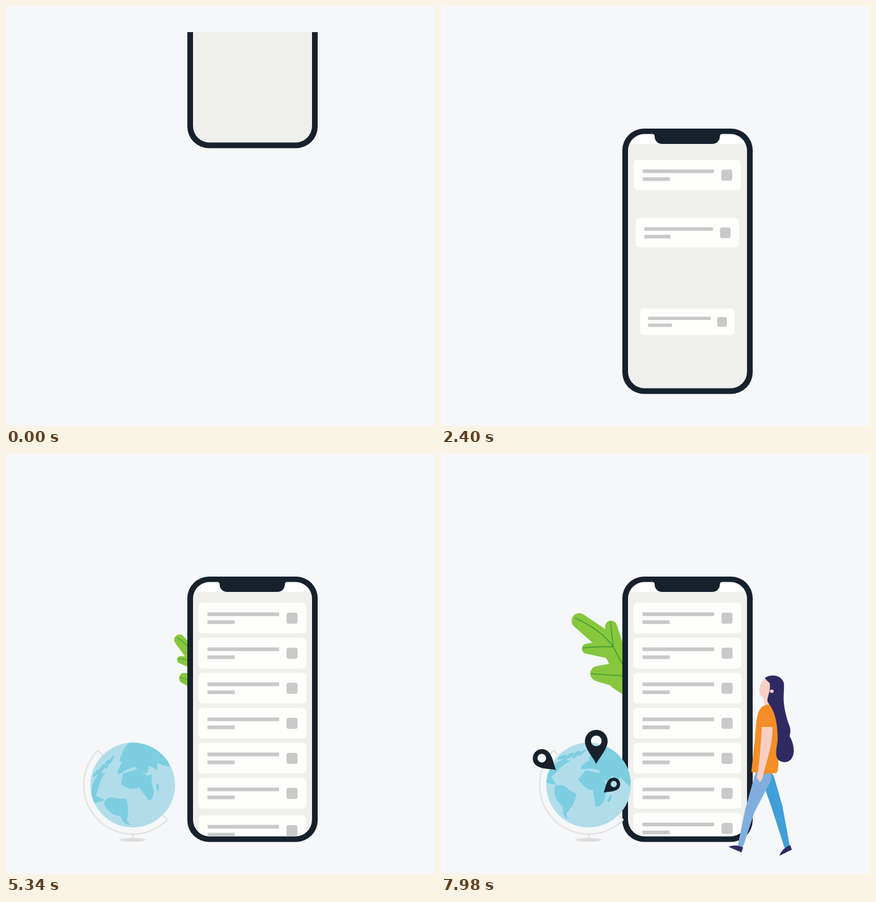
An HTML page with a canvas that plays this animation: 757x740 px, repeating every 8000 ms.

```html
<!DOCTYPE html>
<html lang="en">
<head>
<meta charset="utf-8">
<title>Phone, globe and walker</title>
<style>
  html, body { margin: 0; width: 100%; height: 100%; overflow: hidden; background: #f5f7f9; }
  canvas { display: block; }
</style>
</head>
<body>
<canvas id="stage" width="757" height="740"></canvas>
<script>
const ctx = document.getElementById('stage').getContext('2d');
const LOOP = 8000, TAU = Math.PI * 2, DEG = Math.PI / 180;
const PAPER = '#f5f7f9', INK = '#16212c', GRAY = '#c9c9c9';
const SKIN = '#f9cfc4', HAIR = '#302a63', GREEN = '#86c73d', LAND = '#7ccee0';

function rounded(x, y, w, h, r) {
  const path = new Path2D();
  path.roundRect(x, y, w, h, r);
  return path;
}

function ellipse(x, y, rx, ry = rx, angle = 0) {
  const path = new Path2D();
  path.ellipse(x, y, rx, ry, angle, 0, TAU);
  return path;
}

// Outline around two circles: a limb or a leaf lobe.
function taper(x1, y1, r1, x2, y2, r2) {
  const dir = Math.atan2(y2 - y1, x2 - x1);
  const spread = Math.acos((r1 - r2) / Math.hypot(x2 - x1, y2 - y1));
  const path = new Path2D();
  path.arc(x1, y1, r1, dir + spread, dir - spread + TAU);
  path.arc(x2, y2, r2, dir - spread, dir + spread);
  path.closePath();
  return path;
}

function fill(path, color, rule = 'nonzero') {
  ctx.fillStyle = color;
  ctx.fill(path, rule);
}

function stroke(path, color, width) {
  ctx.strokeStyle = color;
  ctx.lineWidth = width;
  ctx.stroke(path);
}

function group(draw) {
  ctx.save();
  draw();
  ctx.restore();
}

// Scale and turn around a pivot, then shift.
function pose(x, y, scale, angle = 0, dx = 0, dy = 0) {
  ctx.translate(x + dx, y + dy);
  ctx.rotate(angle);
  ctx.scale(scale, scale);
  ctx.translate(-x, -y);
}

// What is left of a cubic ease-out: 1 before the start, 0 after the end.
function remaining(tick, start, duration) {
  const p = Math.min(1, Math.max(0, (tick - start) / duration));
  return (1 - p) ** 3;
}

// Steps come in threes that last 20, 20 and 100 ms.
function tickAt(ms) {
  const shifted = ms + 20, rest = shifted % 140;
  return Math.floor(shifted / 140) * 3 + (rest >= 40 ? 2 : rest >= 20 ? 1 : 0) - 1;
}

const body = rounded(320, 216, 230, 467.5, 38);
const screen = rounded(330, 225.5, 210, 448, 29);
const notch = new Path2D('M373 225 Q377 226 377 230 A13 13 0 0 0 390 243 H479 A13 13 0 0 0 492 230 Q492 226 496 225 Z');
const card = rounded(339.5, 262, 190.5, 54, 7);
const cardIcon = rounded(495, 279.5, 19.5, 19.5, 4);

function drawCards(tick) {
  for (let i = 0; i < 7; i++) {
    const left = remaining(tick, 15 + i * 10, 50);
    group(() => {
      pose(434.75, 289, 1 - 0.44 * left, 0, 0, i * 61.75 + 500 * left);
      fill(card, '#fdfdfc');
      ctx.fillStyle = GRAY;
      ctx.fillRect(355.5, 279, 126.5, 6.5);
      ctx.fillRect(355.5, 293, 48, 6.5);
      fill(cardIcon, GRAY);
    });
  }
}

function drawPhone(tick) {
  group(() => {
    ctx.beginPath();
    ctx.rect(0, 46, 757, 694);
    ctx.clip();
    ctx.translate(0, -870 * remaining(tick, -8.3, 40));
    fill(body, INK);
    group(() => {
      ctx.clip(screen);
      ctx.fillStyle = '#fff';
      ctx.fillRect(330, 225, 210, 18);
      ctx.fillStyle = '#efefed';
      ctx.fillRect(330, 243, 210, 431);
      drawCards(tick);
    });
    fill(notch, INK);
  });
}

const leafParts = [
  taper(244, 294, 13.5, 300, 337, 18),
  taper(300, 304, 10.5, 308, 345, 16),
  taper(257.5, 343, 9, 305, 344, 18),
  taper(277, 387, 13.5, 330, 390, 26),
  new Path2D('M288 310 L312 315 L364 452 L300 410 Q302 372 290 358 Z')
];
const veins = new Path2D('M237 289 Q283 310 304 340 L364 452 M299 296 L304 340 M250 342 Q275 338 304 340 M264 387 L322 391');

function drawLeaf(tick) {
  const left = remaining(tick, 102, 40);
  if (left === 1) return;
  group(() => {
    pose(364, 452, 1 - left, left * 40 * DEG);
    leafParts.forEach(part => fill(part, GREEN));
    stroke(veins, '#3f9a36', 1.6);
  });
}

// The globe is drawn around its own centre.
const globe = { x: 260.5, y: 583.3, r: 74.7 };
const ball = ellipse(0, 0, globe.r);
const base = ellipse(0, 96.5, 22.5, 3.3);
const stand = new Path2D();
stand.arc(0, 0, 86.5, Math.PI / 4, Math.PI * 1.25);
stand.lineTo(-53, -53);
stand.moveTo(53, 53);
stand.lineTo(61, 61);
stand.moveTo(0, 87);
stand.lineTo(0, 95);

const continents = new Path2D(`
  M-18 -11 L-5 -26 L23 -20 L30 -2 L39 -1 Q30 12 28 27 Q18 42 12 37 L8 9 Q-8 8 -18 -11 Z
  M-60 3 Q-48 -6 -34 9 L-21 16 Q-26 36 -39 50 L-37 60 Q-48 54 -45 38 Q-63 25 -60 3 Z
  M-80 -5 Q-66 -38 -45 -45 L-31 -43 Q-46 -36 -55 -25 L-66 -14 L-56 0 Z
  M-14 -28 L-13 -34 L2 -44 L0 -49 Q17 -67 32 -69 Q60 -60 78 -15 L72 3
  L56 -14 L51 -2 L42 -17 L33 -6 Q22 -12 18 -27 L5 -29 Z`);
const madagascar = ellipse(37, 24, 2.5, 7, 0.4);

function drawIslands() {
  let seed = 11;
  const random = () => (seed = seed * 16807 % 2147483647) / 2147483647;
  for (let i = 0; i < 9; i++) {
    const x = -50 + i * 5;
    fill(ellipse(x, -48 - i * 1.6 + random() * 7, 3 + random() * 4, 2 + random() * 2, -0.5), LAND);
  }
}

function drawGlobe(tick) {
  if (tick < 102) return;
  const shift = -120 * remaining(tick, 102, 40);
  group(() => {
    ctx.globalAlpha = Math.min(1, (tick - 101) / 6);
    ctx.translate(globe.x + shift, globe.y);
    stroke(stand, '#e4e1e0', 2.4);
    fill(base, '#e1dcda');
    fill(ball, '#b1ddeb');
    ctx.clip(ball);
    ctx.rotate(shift / globe.r);
    fill(continents, LAND);
    fill(madagascar, LAND);
    drawIslands();
  });
}

// The tip is the origin.
const pin = new Path2D('M0 0 C-5 -11 -20 -26 -20 -40 A20 20 0 0 1 20 -40 C20 -26 5 -11 0 0 Z');
pin.addPath(ellipse(0, -40.5, 9.5));
const pins = [
  { x: 203, y: 557, size: 0.81, angle: -50, start: 124 },
  { x: 274, y: 546, size: 1, angle: 0, start: 146 },
  { x: 287, y: 596.5, size: 0.84, angle: 50, start: 163 }
];

function drawPins(tick) {
  for (const { x, y, size, angle, start } of pins) {
    const scale = size * (1 - remaining(tick, start, 25));
    if (!scale) continue;
    group(() => {
      ctx.translate(x, y);
      ctx.rotate(angle * DEG);
      ctx.scale(scale, scale);
      fill(pin, INK, 'evenodd');
    });
  }
}

const BACK_LEG = '#409fd7', FRONT_LEG = '#80afde';
const walker = [
  [BACK_LEG, taper(577, 572, 11, 593, 622, 9.5)],
  [BACK_LEG, taper(593, 622, 9.5, 610, 690, 5)],
  [FRONT_LEG, taper(568, 570, 15, 545, 628, 8.5)],
  [FRONT_LEG, taper(545, 628, 8.5, 529, 688, 5)],
  [HAIR, new Path2D('M507 692 Q520 687 533 693 L530 702 Z')],
  [HAIR, new Path2D('M597 708 Q600 696 616 689 L619 697 Z')],
  [SKIN, taper(575, 425, 6, 577, 443, 6)],
  [SKIN, ellipse(573, 413, 11, 17, 0.2)],
  ['#f58e28', new Path2D('M571 443 C558 447 556 468 554 500 L547.5 560 Q570 565 592 562 Q597 555 594 520 Q600 465 586 445 Q578 439 571 443 Z')],
  [HAIR, new Path2D(`M571 395 C580 387 601 388 605 404 C606 425 601 430 610 465 C614 480 619 483 615 497
    C628 520 623 543 606 543 C588 541 590 528 594 505 C594 470 588 452 577 438 C573 430 582 422 580 404 Z`)],
  [SKIN, ellipse(583.5, 418, 3.5, 3)],
  [SKIN, new Path2D('M566 481 H585 C585 515 574 540 568 568 Q566 577 562 578 L557 570 C563 540 564 510 566 481 Z')]
];

function drawWalker(tick) {
  if (tick < 148) return;
  const left = remaining(tick, 148, 26);
  group(() => {
    pose(563, 708, 1 - 0.19 * left, 0, 94 * left);
    walker.forEach(([color, path]) => fill(path, color));
  });
}

let begin;
function render(now) {
  begin ??= now;
  const tick = tickAt((now - begin) % LOOP);
  ctx.fillStyle = PAPER;
  ctx.fillRect(0, 0, 757, 740);
  drawLeaf(tick);
  drawPhone(tick);
  drawGlobe(tick);
  drawPins(tick);
  drawWalker(tick);
  requestAnimationFrame(render);
}
requestAnimationFrame(render);
</script>
</body>
</html>
```
